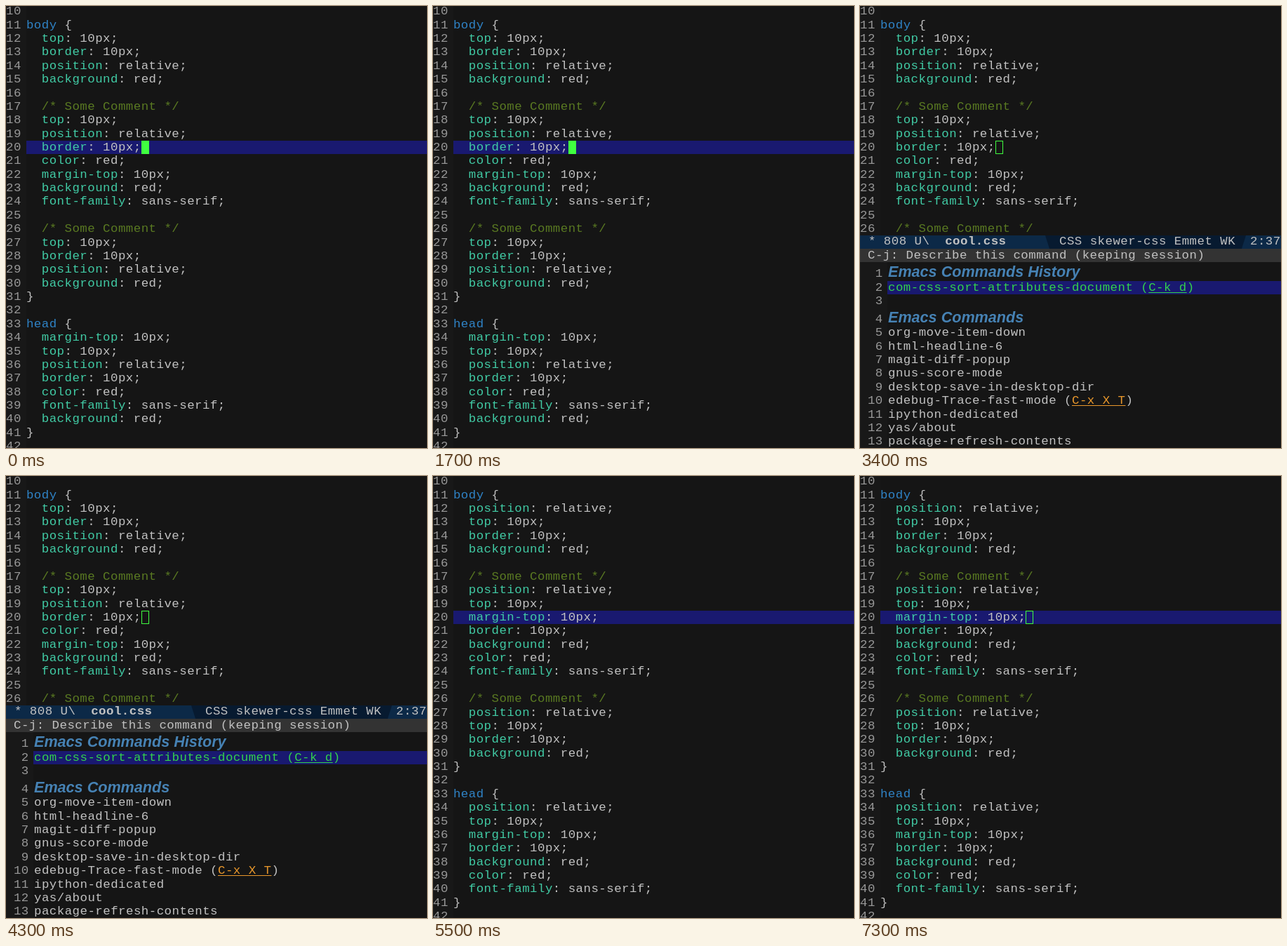
These frames come from a looping animation (600 by 630 pixels, 7.4 s). An HTML page:

```html
<!DOCTYPE html>
<html lang="en">
<head>
<meta charset="utf-8">
<title>Sorting CSS attributes</title>
<style>
html, body { margin: 0; width: 100%; height: 100%; overflow: hidden; background: #151515; }
#stage { position: relative; width: 600px; height: 630px; overflow: hidden; background: #151515;
  color: #c2c2c2; font: 17.4px/19.37px "Liberation Mono", monospace; letter-spacing: 0.48px; }
#stage div { position: absolute; white-space: pre; }
.pane { left: 0; width: 600px; overflow: hidden; }
.num { color: #989898; }
.gutter { left: 0; top: 0; height: 100%; background: #181818; }
.bar { background: #191970; height: 19px; right: 0; }
.sel { color: #2f83c6; }
.prop { color: #41cba5; }
.note { color: #5a7a22; }
.pick { color: #33d24c; }
.key { color: #e8972c; }
u { text-underline-offset: 2px; text-decoration-thickness: 1px; }
.head { color: #4682b4; font: italic bold 21.6px/26px "Liberation Sans", sans-serif; letter-spacing: 0; }
#cursor { width: 11px; height: 19.4px; box-sizing: border-box; border: 1px solid #40ff40; }
#mode { top: 327px; height: 19px; background: #071a30; }
#mode .seg { top: 0; height: 19px; background: #0c2947; }
#title { top: 346px; height: 19px; background: #333; }
#list { top: 365px; height: 265px; background: #151515; }
</style>
</head>
<body>
<div id="stage"></div>
<script>
const CHAR = 10.922, ROW = 19.37, TEXT_X = 28.9, LOOP = 7400;
const MENU_OPENS = 1800, MENU_CLOSES = 4400, FOCUS_LOST = 7000, BLINK = 200;
const stage = document.getElementById("stage");

function box(parent, cls, left, top, html = "") {
  const el = document.createElement("div");
  el.className = cls;
  if (left !== null) el.style.left = left + "px";
  if (top !== null) el.style.top = top + "px";
  el.innerHTML = html;
  parent.append(el);
  return el;
}

function pane(id) {
  const el = box(stage, "pane", 0, null);
  el.id = id;
  return el;
}

const span = (cls, text) => `<span class="${cls}">${text}</span>`;

// Keys are listed in the sorted order of the properties.
const props = {
  p: ["position", "relative"], t: ["top", "10px"], m: ["margin-top", "10px"],
  b: ["border", "10px"], g: ["background", "red"], c: ["color", "red"],
  f: ["font-family", "sans-serif"]
};
const order = Object.keys(props).join("");

function sourceLines(sorted) {
  const block = keys => {
    const list = [...keys];
    if (sorted) list.sort((a, b) => order.indexOf(a) - order.indexOf(b));
    return list.map(k => `  ${span("prop", props[k][0])}: ${props[k][1]};`);
  };
  const open = name => span("sel", name) + " {";
  const note = "  " + span("note", "/* Some Comment */");
  return ["", open("body"), ...block("tbpg"), "", note, ...block("tpbcmgf"), "",
    note, ...block("tbpg"), "}", "", open("head"), ...block("mtpbcfg"), "}", ""];
}

const rowTop = n => 192 + (n - 20) * ROW;

const editor = pane("editor");
editor.style.top = 0;
box(editor, "gutter", 0, 0).style.width = "29px";
const bar = box(editor, "bar", 29, rowTop(20));
const cursor = box(editor, "", 0, rowTop(20));
cursor.id = "cursor";
const views = [false, true].map(sorted => {
  const view = box(editor, "", 0, 0);
  sourceLines(sorted).forEach((line, i) => {
    box(view, "num", 0, rowTop(i + 10), String(i + 10));
    box(view, "", TEXT_X, rowTop(i + 10), line);
  });
  return view;
});

const mode = pane("mode");
const left = box(mode, "seg", 0, 0);
left.style.width = "270px";
left.style.clipPath = "polygon(0 0, 264px 0, 100% 100%, 0 100%)";
const right = box(mode, "seg", 544, 0);
right.style.width = "56px";
right.style.clipPath = "polygon(6px 0, 100% 0, 100% 100%, 0 100%)";
box(mode, "", 12, -1, "* 808 U\\  <b>cool.css</b>");
box(mode, "", 284, -1, "CSS skewer-css Emmet WK");
box(mode, "", 556, -1, "2:37");

const title = pane("title");
box(title, "", 11, 0, "C-j: Describe this command (keeping session)");

const list = pane("list");
box(list, "gutter", 0, 0).style.width = "39px";
box(list, "bar", 39, 27);
const commands = [
  "#Emacs Commands History",
  span("pick", "com-css-sort-attributes-document (<u>C-k d</u>)"),
  "",
  "#Emacs Commands",
  "org-move-item-down", "html-headline-6", "magit-diff-popup", "gnus-score-mode",
  "desktop-save-in-desktop-dir",
  `edebug-Trace-fast-mode (${span("key", "<u>C-x X T</u>")})`,
  "ipython-dedicated", "yas/about", "package-refresh-contents"
];
let y = 1;
commands.forEach((text, i) => {
  const heading = text[0] === "#";
  box(list, "num", 0, y + (heading ? 6 : 0), String(i + 1).padStart(3));
  box(list, heading ? "head" : "", 40, y, heading ? text.slice(1) : text);
  y += heading ? 25.8 : ROW;
});

const show = (el, on) => { el.style.visibility = on ? "visible" : "hidden"; };

function draw(t) {
  const menu = t >= MENU_OPENS && t < MENU_CLOSES;
  const sorted = t >= MENU_CLOSES;
  const hollow = menu || t >= FOCUS_LOST;
  editor.style.height = menu ? "327px" : "630px";
  [mode, title, list].forEach(el => show(el, menu));
  show(bar, !menu);
  views.forEach((view, i) => show(view, sorted === !!i));
  cursor.style.left = TEXT_X + (sorted ? 19 : 15) * CHAR - 0.2 + "px";
  cursor.style.background = hollow ? "none" : "#40ff40";
  show(cursor, hollow || t % (2 * BLINK) < BLINK);
}

const start = performance.now();
function tick() {
  draw((performance.now() - start) % LOOP);
  requestAnimationFrame(tick);
}
tick();
</script>
</body>
</html>
```
